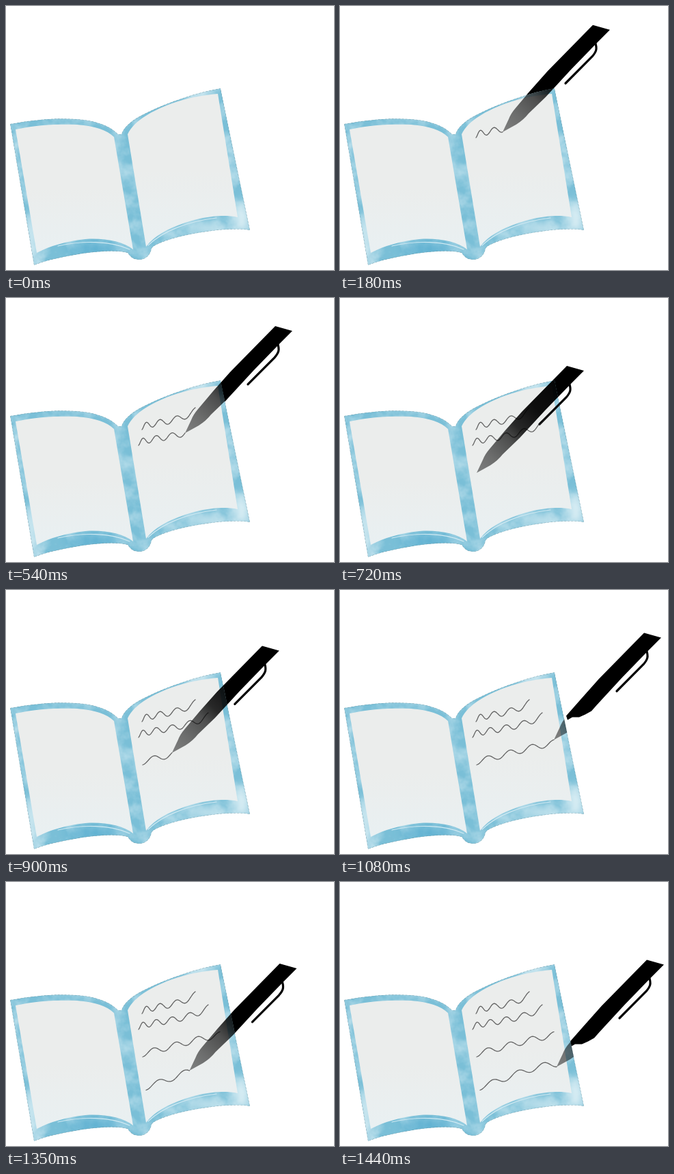
Recreate the animation shown at these times as an HTML page. Size 480 px wide and 385 px high, loop 1.53 s.

```html
<!DOCTYPE html>
<html lang="en">
<head>
<meta charset="utf-8">
<title>Writing in a notebook</title>
<style>
  html, body { margin: 0; width: 100%; height: 100%; overflow: hidden; background: #fff; }
  svg { display: block; width: 100%; height: 100%; }
</style>
</head>
<body>
<svg viewBox="0 0 480 385" xmlns="http://www.w3.org/2000/svg">
  <defs>
    <path id="cover" d="M6 172C45 165 75 163 104 165C132 167 153 175 164 187L169 187C172 176 186 165 205 156C240 139 280 126 314 120L357 327C331 323 290 328 252 337C230 343 215 349 213 354C211 364 204 370 195 370C186 370 182 366 178 360C163 356 140 357 112 361C82 366 59 371 41 378Z"/>
    <path id="pen" d="M0 0L9 -19Q12 -27 19 -35L41 -61L66 -89L132 -156L157 -149L138 -130L100 -91L63 -51L38 -27Q31 -18 20 -11Z"/>
    <path id="clip" d="M135 -132C139 -121 137 -117 131 -110L92 -71" fill="none" stroke-width="3.2" stroke-linecap="round"/>
    <clipPath id="inCover"><use href="#cover"/></clipPath>
    <linearGradient id="ink" gradientUnits="userSpaceOnUse" x1="0" y1="0" x2="150" y2="-150">
      <stop offset="0" stop-opacity=".46"/>
      <stop offset=".15" stop-opacity=".54"/>
      <stop offset=".32" stop-opacity=".67"/>
      <stop offset=".42" stop-opacity=".83"/>
      <stop offset=".6" stop-opacity=".94"/>
      <stop offset="1"/>
    </linearGradient>
    <linearGradient id="paper" x1="0" y1="0" x2="0" y2="1">
      <stop offset=".5" stop-color="#ebedec"/>
      <stop offset="1" stop-color="#e9f0f2"/>
    </linearGradient>
    <filter id="soft" x="-50%" y="-50%" width="200%" height="200%"><feGaussianBlur stdDeviation="7"/></filter>
    <filter id="wash" x="0" y="0" width="100%" height="100%" color-interpolation-filters="sRGB">
      <feTurbulence type="fractalNoise" baseFrequency=".035" numOctaves="4" seed="7"/>
      <feColorMatrix values="0 0 0 0 .9  0 0 0 0 .96  0 0 0 0 .98  1.3 0 0 0 -.5"/>
    </filter>
  </defs>

  <g class="pen">
    <path d="M20 -29L18 -35L41 -61L66 -89L132 -156L157 -149L138 -130L100 -91L63 -51L55 -42L46 -37L37 -33L27 -33Z"/>
    <use href="#clip" stroke="#000"/>
  </g>

  <g clip-path="url(#inCover)">
    <use href="#cover" fill="#7abfd7"/>
    <rect width="480" height="385" filter="url(#wash)"/>
    <g fill="#dceff5" filter="url(#soft)">
      <ellipse cx="345" cy="308" rx="11" ry="24"/>
      <ellipse cx="294" cy="324" rx="28" ry="6"/>
      <ellipse cx="280" cy="128" rx="28" ry="5"/>
      <ellipse cx="38" cy="335" rx="8" ry="34"/>
    </g>
    <ellipse cx="130" cy="354" rx="42" ry="7" fill="#55accf" filter="url(#soft)"/>
    <use href="#cover" fill="none" stroke="#6f929d" stroke-width="1.2" stroke-dasharray="3 2" opacity=".65"/>
  </g>
  <g fill="url(#paper)">
    <path d="M14 180C46 173 78 172 104 173C130 175 148 181 158 191L186 355C171 343 143 338 116 340C88 343 64 350 45 360Z"/>
    <path d="M178 187C188 166 216 152 243 142C265 134 288 130 310 128L339 308C315 303 286 308 262 316C236 325 217 335 205 351Z"/>
  </g>
  <g fill="none" stroke="#cfe9f2" stroke-width="1.2" stroke-linecap="round">
    <path d="M76 350C112 342 153 342 181 355"/>
    <path d="M208 349C231 327 268 314 308 309"/>
  </g>
  <g id="notes" fill="none" stroke="#636363" stroke-width="1.3" stroke-linecap="round"></g>

  <g clip-path="url(#inCover)">
    <g class="pen">
      <use href="#pen" fill="url(#ink)"/>
      <use href="#clip" stroke="url(#ink)"/>
    </g>
  </g>
</svg>
<script>
const STEP = 90, AMP = 4.5;

// midline ends, wave count and spacing, sag, then steps and easing of the pen
const lines = [
  { from: [199, 187.5], to: [277, 164.5], waves: 3.5, pace: 0.78, sag: 4, steps: 3, ease: 1 },
  { from: [194, 210.5], to: [296, 183.5], waves: 4.5, pace: 0.8, sag: 4.5, steps: 4, ease: 1 },
  { from: [200, 250.5], to: [313, 223], waves: 3.5, pace: 1, sag: -1, steps: 5, ease: 1.4 },
  { from: [205, 299], to: [317, 265], waves: 3, pace: 1, sag: -3.5, steps: 4, ease: 1.4 }
];

const mix = (a, b, u) => a + (b - a) * u;

function point({ from, to, waves, pace, sag }, u) {
  const wave = AMP * Math.cos(2 * Math.PI * waves * u ** pace);
  const bend = sag * 6.75 * u * u * (1 - u);
  return [mix(from[0], to[0], u), mix(from[1], to[1], u) + wave + bend];
}

function trace(line, end) {
  const n = Math.ceil(end * 80);
  let d = '';
  for (let i = 0; i <= n; i++) {
    d += (i ? 'L' : 'M') + point(line, end * i / n).map(v => v.toFixed(2));
  }
  return n ? d : '';
}

// one empty step, then each line in turn
const stops = [null];
lines.forEach((line, row) => {
  for (let k = 0; k < line.steps; k++) {
    stops.push({ row, u: (k / (line.steps - 1)) ** line.ease });
  }
});

const notes = document.getElementById('notes');
const strokes = lines.map(() =>
  notes.appendChild(document.createElementNS('http://www.w3.org/2000/svg', 'path')));
const pens = document.querySelectorAll('.pen');

function draw(ms) {
  const stop = stops[Math.floor(ms / STEP) % stops.length];
  const { row, u } = stop || { row: 0, u: 0 };
  strokes.forEach((s, i) =>
    s.setAttribute('d', trace(lines[i], i < row ? 1 : i === row ? u : 0)));
  const [x, y] = point(lines[row], u);
  pens.forEach(p => {
    p.setAttribute('visibility', stop ? 'visible' : 'hidden');
    p.setAttribute('transform', `translate(${x} ${y})`);
  });
}

const start = performance.now();
function tick() {
  draw(performance.now() - start);
  requestAnimationFrame(tick);
}
draw(0);
requestAnimationFrame(tick);
</script>
</body>
</html>
```
